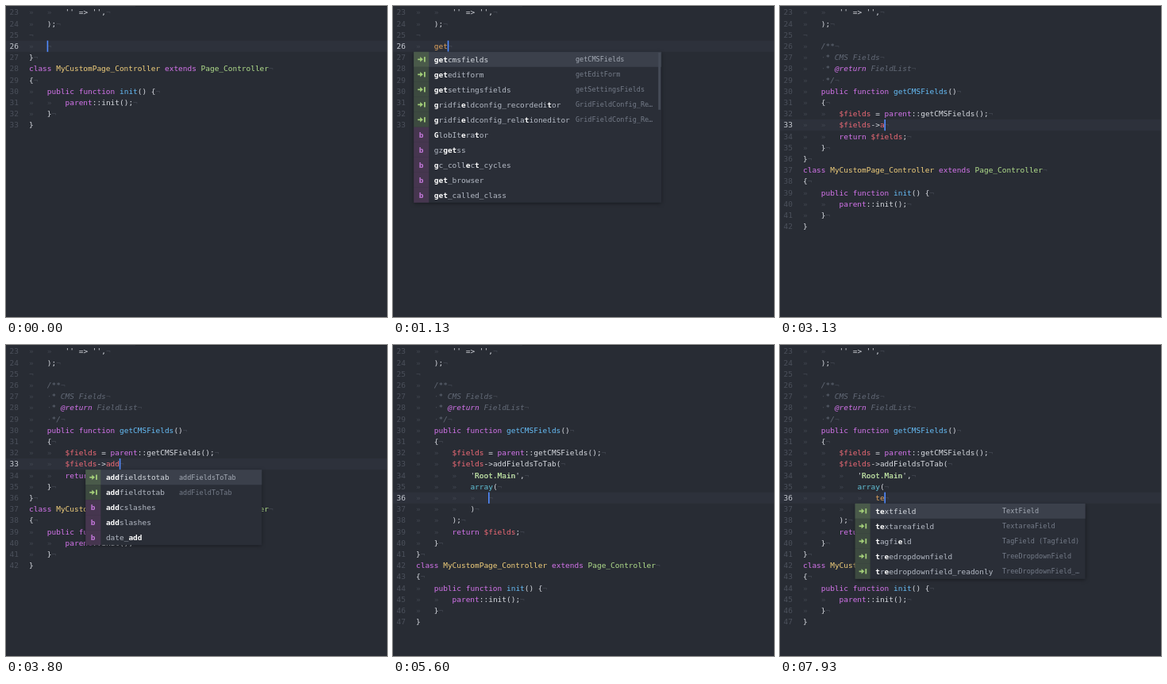
Recreate the animation shown at these times as an HTML page with a canvas. Size 480 by 392 pixels, loop 8000 ms.

```html
<!DOCTYPE html>
<html lang="en">
<head>
<meta charset="utf-8">
<title>Editor autocomplete</title>
<style>
html, body { margin: 0; width: 100%; height: 100%; overflow: hidden; background: #282c34; }
canvas { display: block; width: 480px; height: 392px; }
</style>
</head>
<body>
<canvas id="stage"></canvas>
<script>
const W = 480, H = 392, LOOP = 8000;
const CW = 5.7, PITCH = 14.2, LEFT = 29, FIRST = 23, ROW = 19;
const MONO = '"DejaVu Sans Mono", monospace';
const C = {
  bg: '#282c34', line: '#2d313b', text: '#d7dae0', dim: '#414650',
  key: '#d574ec', type: '#f3d07c', base: '#b2df8c', fn: '#66bdf7',
  name: '#ee6a76', word: '#e0a25c', str: '#b2df8c', arr: '#62c3d8',
  note: '#636a77', num: '#4b505b', numOn: '#c6cad2', caret: '#528bff'
};

const canvas = document.getElementById('stage');
const ctx = canvas.getContext('2d');
const dpr = window.devicePixelRatio || 1;
canvas.width = W * dpr;
canvas.height = H * dpr;
ctx.scale(dpr, dpr);

const HEAD = ["\t\t'' => '',", '\t);', ''];
const TAIL = [
  '}', 'class MyCustomPage_Controller extends Page_Controller', '{',
  '\tpublic function init() {', '\t\tparent::init();', '\t}', '}'
];
const METHOD = [
  '\t/**', '\t * CMS Fields', '\t * @return FieldList', '\t */',
  '\tpublic function getCMSFields()', '\t{',
  '\t\t$fields = parent::getCMSFields();'
];
const METHOD_END = ['\t\treturn $fields;', '\t}'];

// Popup entries: [name, label]; entries without a label are built-in functions.
const GET = {
  line: 26, col: 4, width: 312, labelX: 230, bar: true,
  items: [
    ['getcmsfields', 'getCMSFields'], ['geteditform', 'getEditForm'],
    ['getsettingsfields', 'getSettingsFields'],
    ['gridfieldconfig_recordeditor', 'GridFieldConfig_Re…'],
    ['gridfieldconfig_relationeditor', 'GridFieldConfig_Re…'],
    ['GlobIterator'], ['gzgetss'], ['gc_collect_cycles'], ['get_browser'], ['get_called_class']
  ]
};
const ADD = {
  line: 33, col: 17, width: 222, labelX: 218,
  items: [
    ['addfieldstotab', 'addFieldsToTab'], ['addfieldtotab', 'addFieldToTab'],
    ['addcslashes'], ['addslashes'], ['date_add']
  ]
};
const FIELD = {
  line: 36, col: 16, width: 290, labelX: 280,
  items: [
    ['textfield', 'TextField'], ['textareafield', 'TextareaField'],
    ['tagfield', 'TagField (Tagfield)'], ['treedropdownfield', 'TreeDropdownField'],
    ['treedropdownfield_readonly', 'TreeDropdownField_…'],
    ['tan'], ['tanh'], ['touch'], ['trait'], ['trim']
  ]
};

const EVENTS = [{ at: 0, line: 26, typed: '' }];
const on = (at, line, typed, extra) => EVENTS.push({ at, line, typed, ...extra });
on(530, 26, 'g');
on(600, 26, 'g', { popup: GET, query: 'g' });
on(700, 26, 'ge', { popup: GET, query: 'ge' });
on(870, 26, 'get', { popup: GET, query: 'get' });
on(1400, 33, '');
[...'$fields->'].forEach((_, i) => on(2000 + i * 105, 33, '$fields->'.slice(0, i + 1)));
on(3070, 33, '$fields->a');
on(3270, 33, '$fields->a', { popup: ADD, query: 'a' });
on(3540, 33, '$fields->ad', { popup: ADD, query: 'ad' });
on(3740, 33, '$fields->add', { popup: ADD, query: 'add' });
on(4400, 34, '', { select: [13, 9] });
on(5400, 36, '');
on(7420, 36, 't');
on(7530, 36, 't', { popup: FIELD, query: 't' });
on(7670, 36, 'te', { popup: FIELD, query: 'te' });

function documentFor(s) {
  let block;
  if (s.line === 26) block = ['\t' + s.typed];
  else if (s.line === 33) block = [...METHOD, '\t\t' + s.typed, ...METHOD_END];
  else block = [
    ...METHOD, '\t\t$fields->addFieldsToTab(', "\t\t\t'Root.Main',", '\t\t\tarray(',
    '\t\t\t\t' + s.typed, '\t\t\t)', '\t\t);', ...METHOD_END
  ];
  return [...HEAD, ...block, ...TAIL];
}

const colX = col => LEFT + col * CW;
const rowY = n => 8 + (n - FIRST) * PITCH;

function write(text, x, y, color, style = '', size = 9.46) {
  ctx.font = `${style} ${size}px ${MONO}`;
  ctx.fillStyle = color;
  ctx.fillText(text, x, y + size * 0.36);
}

function box(x, y, w, h, color) {
  ctx.fillStyle = color;
  ctx.fillRect(x, y, w, h);
}

const TOKEN = /\$\w*|'[^']*'|\w+|[^\w$']+/g;
const KEYWORDS = /^(public|function|class|extends|return|parent)$/;

function tokenColor(word, before, after) {
  if (KEYWORDS.test(word)) return C.key;
  if (word[0] === '$') return C.name;
  if (word === 'array') return C.arr;
  if (/class $/.test(before)) return C.type;
  if (/extends $/.test(before)) return C.base;
  if (/function $/.test(before)) return C.fn;
  if (/->$/.test(before) && !after) return C.name;
  if (/^\w+$/.test(word) && !before && !after) return C.word;
  return C.text;
}

function drawLine(source, n, last) {
  const y = rowY(n);
  const tabs = source.match(/^\t*/)[0].length;
  const code = source.slice(tabs);
  const start = tabs * 4;
  for (let i = 0; i < tabs; i++) write('»', colX(i * 4), y, C.dim);

  if (/^(\/\*| \*)/.test(code)) {
    if (code[0] === ' ') write('·', colX(start), y, C.dim);
    write(code, colX(start), y, C.note, 'italic');
    const tag = code.indexOf('@return');
    if (tag >= 0) {
      box(colX(start + tag), y - 6, 7 * CW, 12, C.bg);
      write('@return', colX(start + tag), y, C.key, 'italic');
    }
  } else {
    for (const m of code.matchAll(TOKEN)) {
      const word = m[0], x = colX(start + m.index);
      const before = code.slice(0, m.index), after = code.slice(m.index + word.length);
      write(word, x, y, tokenColor(word, before, after));
      if (word[0] === "'" && word.length > 2) write(word.slice(1, -1), x + CW, y, C.str);
    }
  }
  if (!last) write('¬', colX(start + code.length), y, C.dim);
}

// A contiguous match wins; otherwise letters are matched in order.
function matches(name, query) {
  const low = name.toLowerCase(), whole = low.indexOf(query);
  if (whole >= 0) return [...query].map((_, i) => whole + i);
  const found = [];
  let from = 0;
  for (const ch of query) {
    const i = low.indexOf(ch, from);
    if (i < 0) return null;
    found.push(i);
    from = i + 1;
  }
  return found;
}

function snippetIcon(x, y) {
  box(x + 5, y - 0.8, 5, 1.7, '#a3ce79');
  ctx.beginPath();
  ctx.moveTo(x + 8, y - 3.2);
  ctx.lineTo(x + 11.7, y);
  ctx.lineTo(x + 8, y + 3.2);
  ctx.fill();
  box(x + 12.8, y - 3.2, 1.8, 6.4, '#a3ce79');
}

function drawPopup(p, query) {
  const items = p.items.filter(item => matches(item[0], query));
  const textX = colX(p.col), x = textX - 25.6, top = rowY(p.line) + 7.2;
  const height = items.length * ROW;
  ctx.save();
  ctx.shadowColor = 'rgba(0,0,0,.5)';
  ctx.shadowBlur = 5 * dpr;
  ctx.shadowOffsetY = dpr;
  box(x, top, p.width, height, '#2a2e37');
  ctx.restore();

  items.forEach(([name, label], i) => {
    const y0 = top + i * ROW, y = y0 + ROW / 2;
    if (!i) box(x, y0, p.width, ROW, '#3b404b');
    box(x, y0, 19, ROW, label ? (i ? '#3d4a40' : '#4a5a4a') : '#46364f');
    if (label) snippetIcon(x, y);
    else write('b', x + 6.5, y, '#c678dd', 'bold');
    const hit = matches(name, query);
    [...name].forEach((ch, k) => {
      const strong = hit.includes(k);
      write(ch, textX + k * CW, y, strong ? '#ffffff' : (i ? '#b4bac5' : '#d3d7de'), strong ? 'bold' : '');
    });
    if (label) write(label, p.labelX, y, i ? '#747b88' : '#a5abb6', '', 8.5);
  });
  if (p.bar) box(x + p.width - 4, top + 1, 3, 72, '#454b57');
}

function draw(t) {
  const s = EVENTS.filter(e => e.at <= t).pop();
  const lines = documentFor(s);
  box(0, 0, W, H, C.bg);
  box(163, 0, W - 163, 1, '#1f2329');

  const y = rowY(s.line);
  if (s.select) box(colX(s.select[0]), y - 7, s.select[1] * CW, PITCH, '#474d59');
  else box(0, y - 7, W, PITCH, C.line);

  lines.forEach((source, i) => {
    const n = FIRST + i;
    write(String(n), 4.5, rowY(n), n === s.line ? C.numOn : C.num);
    drawLine(source, n, i === lines.length - 1);
  });

  if (!s.select && (t - s.at) % 800 < 400) {
    const source = lines[s.line - FIRST];
    const tabs = source.match(/^\t*/)[0].length;
    box(colX(source.length + tabs * 3) - 0.2, y - 7, 1.6, PITCH, C.caret);
  }
  if (s.popup) drawPopup(s.popup, s.query);
}

const began = performance.now();
function tick() {
  draw((performance.now() - began) % LOOP);
  requestAnimationFrame(tick);
}
tick();
</script>
</body>
</html>
```
